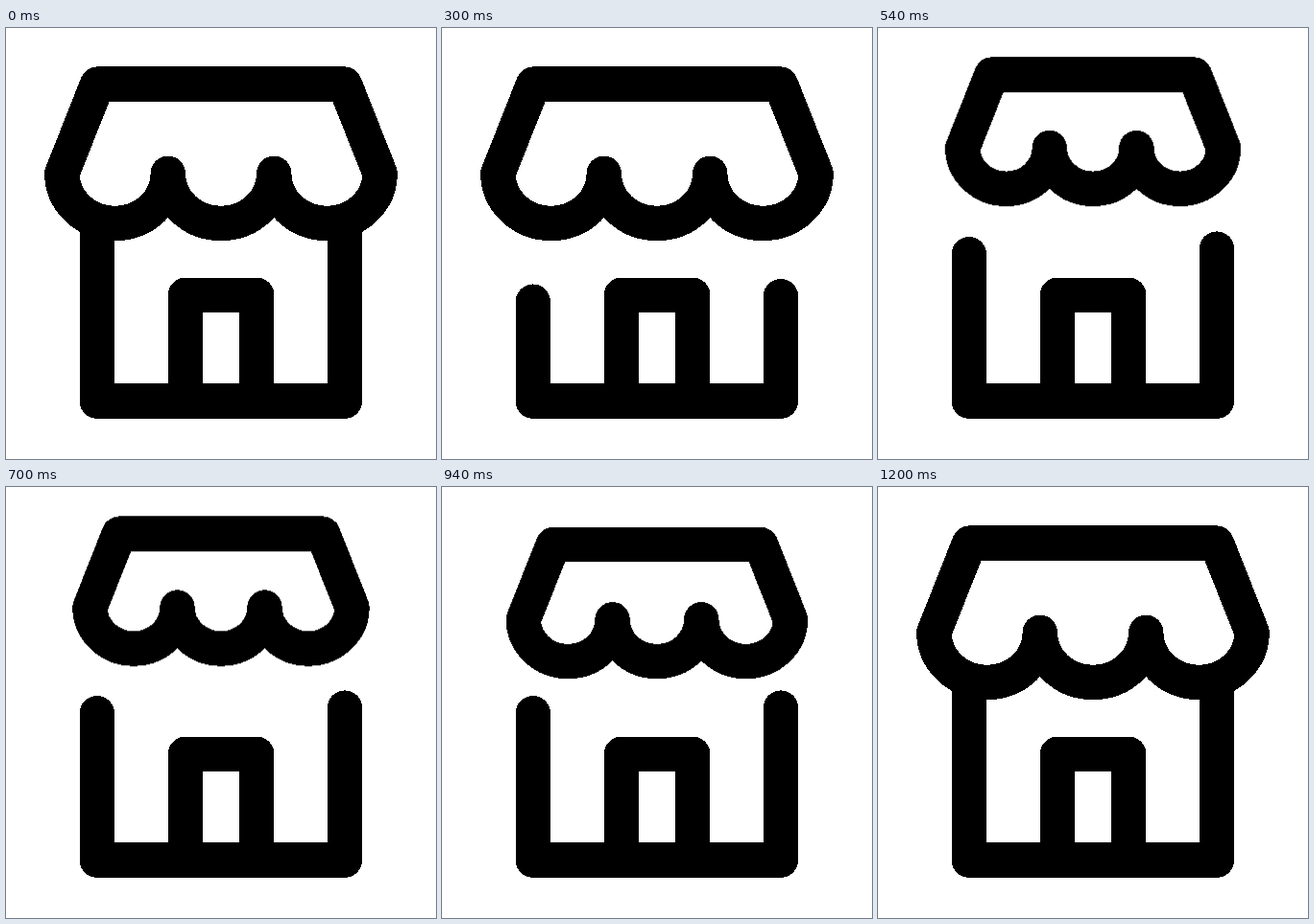
Recreate the animation shown at these times as an HTML page. Size 448 px wide and 450 px high, loop 1.22 s.

```html
<!DOCTYPE html>
<html lang="en">
<head>
<meta charset="utf-8">
<title>Shop icon</title>
<style>
  html, body { margin: 0; width: 100%; height: 100%; overflow: hidden; background: #fff; }
  svg { display: block; width: 100vw; height: 100vh; }
  path {
    fill: none;
    stroke: #000;
    stroke-width: 36.4px;
    stroke-linecap: round;
    stroke-linejoin: round;
    shape-rendering: crispEdges;
  }

  /* The awning shrinks and hops; its line weight stays the same. */
  .awning {
    vector-effect: non-scaling-stroke;
    transform-origin: 224px 131.2px;
    animation: hop 1220ms cubic-bezier(.37, 0, .63, 1) infinite;
  }
  @keyframes hop {
    0%, 30.08%      { transform: translateY(0) scale(1); }
    44.67%, 56.56%  { transform: translateY(-23px) scale(.82); }
    65.57%          { transform: translateY(0) scale(1); }
    80.33%, 86.89%  { transform: translateY(-11.4px) scale(.82); }
    96.72%, 100%    { transform: translateY(0) scale(1); }
  }

  /* Walls are drawn from the floor up, so the offset trims their tops. */
  .wall {
    stroke-dasharray: 312.4px 400px;
    animation: trim 1220ms cubic-bezier(.37, 0, .63, 1) infinite;
  }
  @keyframes trim {
    0%              { stroke-dashoffset: 0px; }
    24.59%          { stroke-dashoffset: 73.9px; }
    32.79%          { stroke-dashoffset: 0px; }
    40.16%, 57.38%  { stroke-dashoffset: 24.4px; }
    65.57%          { stroke-dashoffset: 0px; }
    72.95%, 88.52%  { stroke-dashoffset: 24.4px; }
    96.72%, 100%    { stroke-dashoffset: 0px; }
  }
</style>
</head>
<body>
<svg viewBox="0 0 448 450">
  <path class="wall" d="M229.4 389.6H94.8V211.8"/>
  <path class="wall" d="M224 389.6H353V206.2"/>
  <path d="M186.9 389.6V278.8H261.2V389.6"/>
  <path class="awning" d="M58.4 151.8L95.2 58.6H352.8L389.6 151.8
    M58.4 151.8A55.2 52.2 0 0 0 168.8 151.8
    M168.8 151.8A55.2 52.2 0 0 0 279.2 151.8
    M279.2 151.8A55.2 52.2 0 0 0 389.6 151.8"/>
</svg>
</body>
</html>
```
